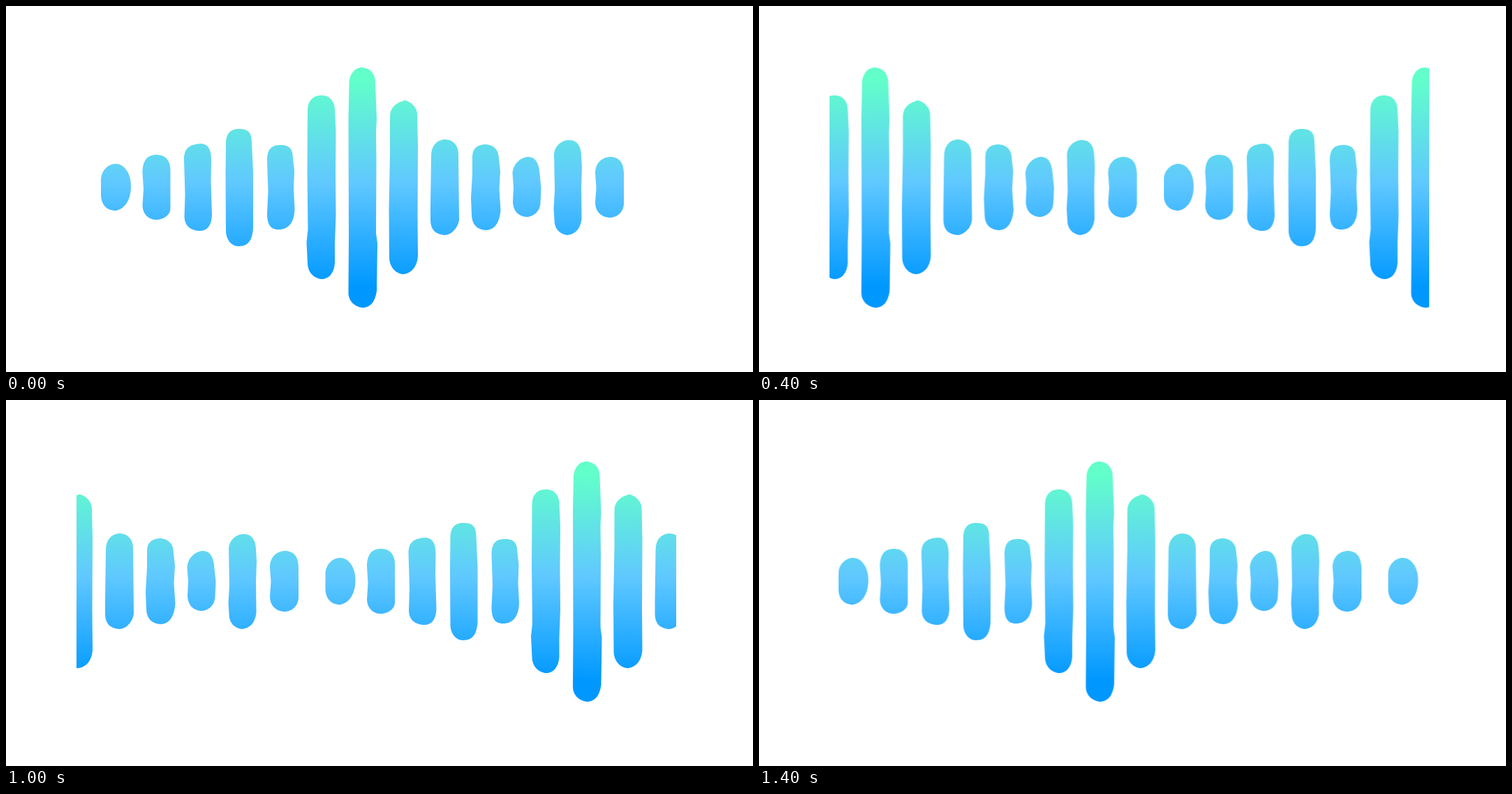
Write an HTML page without scripts that moves like this. It is 1070 px wide and 524 px high and loops after 1.6 s.

```html
<!DOCTYPE html>
<html lang="en">
<head>
<meta charset="utf-8">
<title>Sound wave</title>
<style>
  html, body { margin: 0; width: 100%; height: 100%; overflow: hidden; background: #fff; }
  svg { display: block; width: 100%; height: 100%; }
  /* Eight hard steps of 221.8 px; the wave repeats every 787.5 px */
  .run { animation: run 1.6s steps(8, end) infinite; }
  @keyframes run { to { transform: translateX(1774.4px); } }
</style>
</head>
<body>
<svg viewBox="0 0 1070 524">
  <defs>
    <linearGradient id="tint" gradientUnits="userSpaceOnUse" x1="0" y1="88" x2="0" y2="432">
      <stop offset=".05" stop-color="#62ffca"/>
      <stop offset=".48" stop-color="#60c8ff"/>
      <stop offset=".91" stop-color="#0098ff"/>
    </linearGradient>
    <clipPath id="view"><path d="M101 0H960V524H101Z"/></clipPath>
    <g id="wave" fill="url(#tint)">
      <path d="M157 226C169 226 179 239 179 258C179 279 169 291 157 293C144 293 136 284 136 270V249C136 236 146 226 157 226Z"/>
      <path d="M214 213C228 212 235.5 221 235.5 235V289C236 299 226 306 215 306C204 306 196 298 195.5 286L197 262L195.5 238C196 221 202 214 214 213Z"/>
      <path d="M280 197C290 198 294 206 294 220L293.5 250L295 300C294 315 288 322 277 322C264 321 256 315 255.5 302L256.5 270L255 220C255 203 263 198 280 197Z"/>
      <path d="M333 176C347 176 352 181 352 195L354 238V318C353 334 348 344 333 344C322 344 315 333 315 322L314.5 240L315 198C315 182 322 176 333 176Z"/>
      <path d="M393 199C407 199 411 206 411 218L413 236L412 262L413.5 290C413 310 405 320 390 320C378 320 374 311 374 297L375.5 265L374 222C374 205 380 199 393 199Z"/>
      <path d="M452 128C465 128 471 138 471 148L472.5 180L472 240L472.5 300L471 340V368C470 383 462 391 452 391C441 390 432 381 432 368L430.5 338L432.5 320L431.5 240L432 150C432 135 440 128 452 128Z"/>
      <path d="M510 88C522 89 529 97 529 110L531 162L530 180L530.5 220L530 325L532 340L531 408C529 423 522 432 511 432C499 431 491 422 490.5 412L491 330L490.5 160L491.5 110C492 97 500 88 510 88Z"/>
      <path d="M571 135C581 137 589 146 589 155L590 200L589.5 300L590 358C589 374 580 383 569 384C557 383 549 372 549 360L548.5 290L550 210V158C550 146 558 139 571 135Z"/>
      <path d="M628 191C640 191 648 199 648 212L649 306C648 317 638 328 628 328C615 327 608 320 608 306V288L609 215C609 200 617 192 628 191Z"/>
      <path d="M687 198C700 199 706 207 706 219L708 237L706.5 262L708.5 292C707 310 700 321 687 321C673 320 667 311 667 298L666 275L668 240V218C668 204 674 199 687 198Z"/>
      <path d="M747 216C757 215 763 224 764 236L766.5 260L765.5 282C765 294 756 302 745 302C733 301 726 292 726 280L727 260L725.5 240C726 226 737 217 747 216Z"/>
      <path d="M806 192C818 191 824 201 824 214L825 230L824 260L824.5 305C823 319 815 327 804 328C793 327 785 318 785.5 306L784.5 290L786 265L785 212C786 200 796 192 806 192Z"/>
      <path d="M865 216C879 216 885 225 885 240V284C884 296 875 303 864 303C852 302 844 294 844 281L845.5 260L844 240C844 225 853 217 865 216Z"/>
    </g>
  </defs>
  <g clip-path="url(#view)">
    <g class="run">
      <use href="#wave"/>
      <use href="#wave" x="-787.5"/>
      <use href="#wave" x="-1575"/>
    </g>
  </g>
</svg>
</body>
</html>
```
